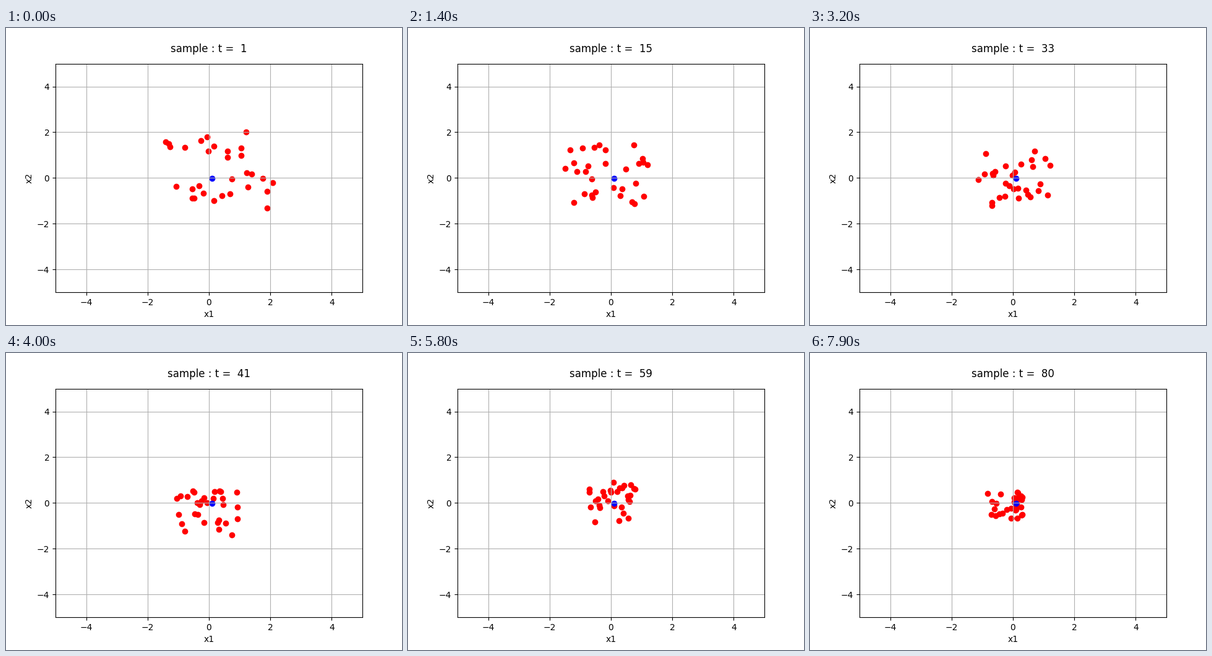
Animation, 640 px wide and 480 px high, one loop 8000 ms. Source, as a matplotlib script:

```python
import numpy as np
import matplotlib.pyplot as plt
from matplotlib.animation import FuncAnimation

STEPS = 80
COUNT = 30
BEST = (0.1, -0.02)

# Key points of the swarm centre's drift: step, x1, x2
DRIFT_T, *DRIFT = zip((0, .33, .33), (14, -.13, .17), (25, .15, 0),
                      (40, -.05, -.2), (50, -.07, .3), (67, .27, .1),
                      (79, -.08, -.09))

rng = np.random.default_rng(7)
speed = rng.uniform(.3, .8, (COUNT, 2))
phase = rng.uniform(0, 2 * np.pi, (COUNT, 2))
reach = rng.uniform(.6, 1.4, (COUNT, 2))


def swarm(i):
    """Particles swing around a drifting centre while the spread decays."""
    swing = reach * np.sin(speed * i + phase)
    swing = (swing - swing.mean(0)) / swing.std(0)
    spread = np.exp(-1.05 * i / (STEPS - 1))
    centre = [np.interp(i, DRIFT_T, axis) for axis in DRIFT]
    return centre + spread * swing


fig, ax = plt.subplots(figsize=(6.4, 4.8), dpi=100)
ax.set(xlim=(-5, 5), ylim=(-5, 5), xlabel="x1", ylabel="x2")
ax.set_xticks(range(-4, 5, 2))
ax.set_yticks(range(-4, 5, 2))
ax.grid(True)

dots = ax.scatter(*swarm(0).T, c="red")
ax.scatter(*BEST, c="blue")
title = ax.text(0.5, 1.05, "", ha="center", size="large",
                transform=ax.transAxes)


def update(i):
    dots.set_offsets(swarm(i))
    title.set_text(f"sample : t =  {i + 1}")
    return dots, title


anim = FuncAnimation(fig, update, frames=STEPS, interval=100,
                     repeat=True, repeat_delay=0)
plt.show()
```
